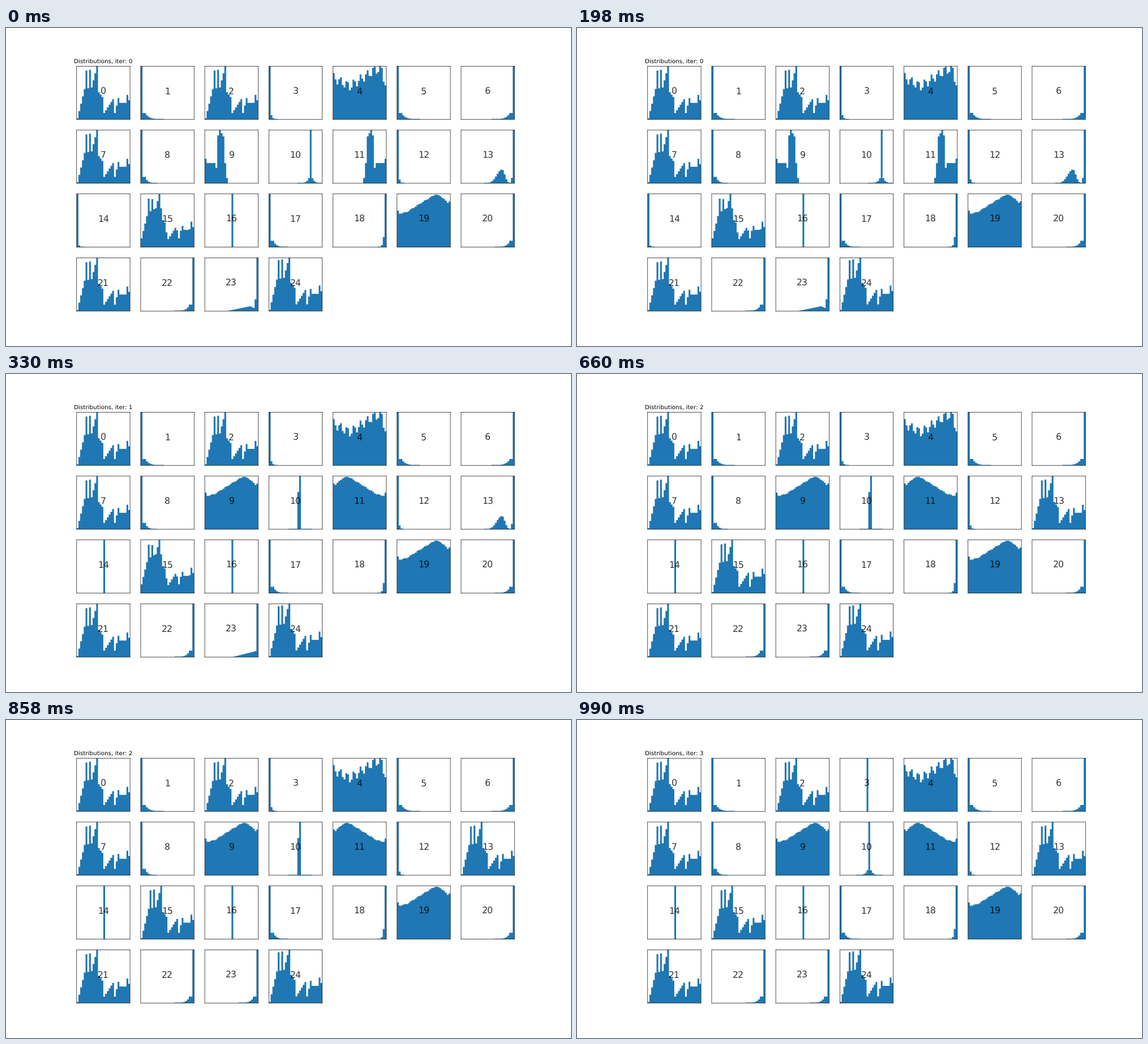
Recreate the animation shown at these times as a matplotlib script. Size 998 px wide and 561 px high, loop 1320 ms.

```python
import numpy as np
import matplotlib.pyplot as plt
from matplotlib.animation import FuncAnimation

WIDTH, HEIGHT, DPI = 998, 561, 62.375
ROWS, COLS, BINS = 4, 7, 30
BLUE = "#1f77b4"

plt.rcParams["font.family"] = "DejaVu Sans"
plt.rcParams["text.hinting"] = "none"

bins = np.arange(BINS)


def curve(*points):
    """Heights interpolated between (bin, percent) key points."""
    xs, ys = zip(*points)
    return np.interp(bins, xs, ys) / 100


def ripple(size, period=3.75):
    return size * np.cos(2 * np.pi * bins / period)


def trace(h):
    """Keep nearly empty bins visible as a thin line."""
    return np.where(h > 0.001, np.maximum(h, 0.009), 0)


def tail(level, ratio, shelf=1):
    """Full first bin, then a geometric tail after a short shelf."""
    h = trace(level * ratio ** np.maximum(bins - shelf, 0.0))
    h[0] = 1
    return h


def bar(k):
    return (bins == k).astype(float)


def peak(k, level=0.2, ratio=0.47):
    """Full bin k with thin flanks on both sides."""
    return np.maximum(bar(k), trace(level * ratio ** abs(bins - k)))


def bump(top):
    """Skewed hump beside a full last bin."""
    spread = np.where(bins < 22.5, 2.9, 1.6)
    hump = trace(top * np.exp(-0.5 * ((bins - 22.5) / spread) ** 2))
    return hump + 0.1 * bar(28) + bar(29)


twin = curve((0, 2), (4, 57), (8, 60), (11, 100), (12, 51), (14, 42), (15, 12),
             (20, 38), (21, 12), (23, 40), (24, 31), (27, 31), (28, 46), (29, 36))
twin += 0.34 * (bar(5) + bar(7))
# The same data over a narrower range, and with a higher scale
twin_zoomed = np.interp(1 + bins * 28 / 29, bins, twin)
twin_zoomed /= twin_zoomed.max()
twin_scaled = np.minimum(1.04 * twin, 1)

rough = curve((0, 78), (9, 62), (23, 93), (27, 94), (29, 65)) + ripple(0.09)
hill = curve((0, 68), (1, 63), (5, 66), (14, 85), (21, 99), (24, 96),
             (28, 84), (29, 86)) + ripple(0.008)
cliff = curve((0, 46), (1, 38), (5, 38), (6, 29), (7, 90), (8, 100), (10, 88),
              (11, 38), (12, 10), (13, 0))
spike = bar(15)
long_tail, mid_tail, short_tail = (tail(0.12, r, 2) for r in (0.635, 0.56, 0.5))

# Each panel: iteration at which a shape appears -> bin heights
shapes = [
    {0: twin},
    {0: long_tail},
    {0: twin},
    {0: tail(0.08, 0.3), 3: spike},
    {0: rough},
    {0: long_tail},
    {0: long_tail[::-1]},
    {0: twin},
    {0: short_tail},
    {0: cliff, 1: hill},
    {0: peak(23), 1: np.maximum(peak(17, 0.01, 0.7), 0.7 * bar(16)), 3: peak(16)},
    {0: cliff[::-1], 1: hill[::-1]},
    {0: tail(0.07, 0.2)},
    {0: bump(0.26), 1: bump(0.25), 2: twin},
    {0: tail(0.03, 0.3), 1: spike},
    {0: twin_zoomed, 2: twin},
    {0: spike},
    {0: mid_tail},
    {0: tail(0.19, 0.2)[::-1]},
    {0: hill},
    {0: mid_tail[::-1]},
    {0: twin},
    {0: mid_tail[::-1]},
    {0: curve((12, 0), (25, 9), (27, 6), (28, 22), (29, 100)),
     1: curve((15, 0), (27, 10), (28, 11), (29, 100)),
     2: mid_tail[::-1]},
    {0: twin_scaled},
]

fig = plt.figure(figsize=(WIDTH / DPI, HEIGHT / DPI), dpi=DPI, facecolor="white")
edges = np.linspace(0, 1, BINS + 1)
hists = []
for i, stages in enumerate(shapes):
    ax = fig.add_subplot(ROWS, COLS, i + 1, xticks=[], yticks=[])
    hists.append(ax.stairs(stages[0], edges, fill=True, color=BLUE, lw=0, snap=False))
    ax.set(xlim=(0, 1), ylim=(0, 1))
    for spine in ax.spines.values():
        spine.set_snap(False)
    ax.text(0.5, 0.474, str(i), fontsize=18, ha="center", va="baseline", alpha=0.8)
title = fig.axes[0].set_title("", fontsize=12)


def update(step):
    title.set_text(f"Distributions, iter: {step}")
    for hist, stages in zip(hists, shapes):
        hist.set_data(stages[max(s for s in stages if s <= step)])
    return [title, *hists]


anim = FuncAnimation(fig, update, frames=4, interval=330, repeat=True,
                     repeat_delay=0, blit=False)
plt.show()
```
